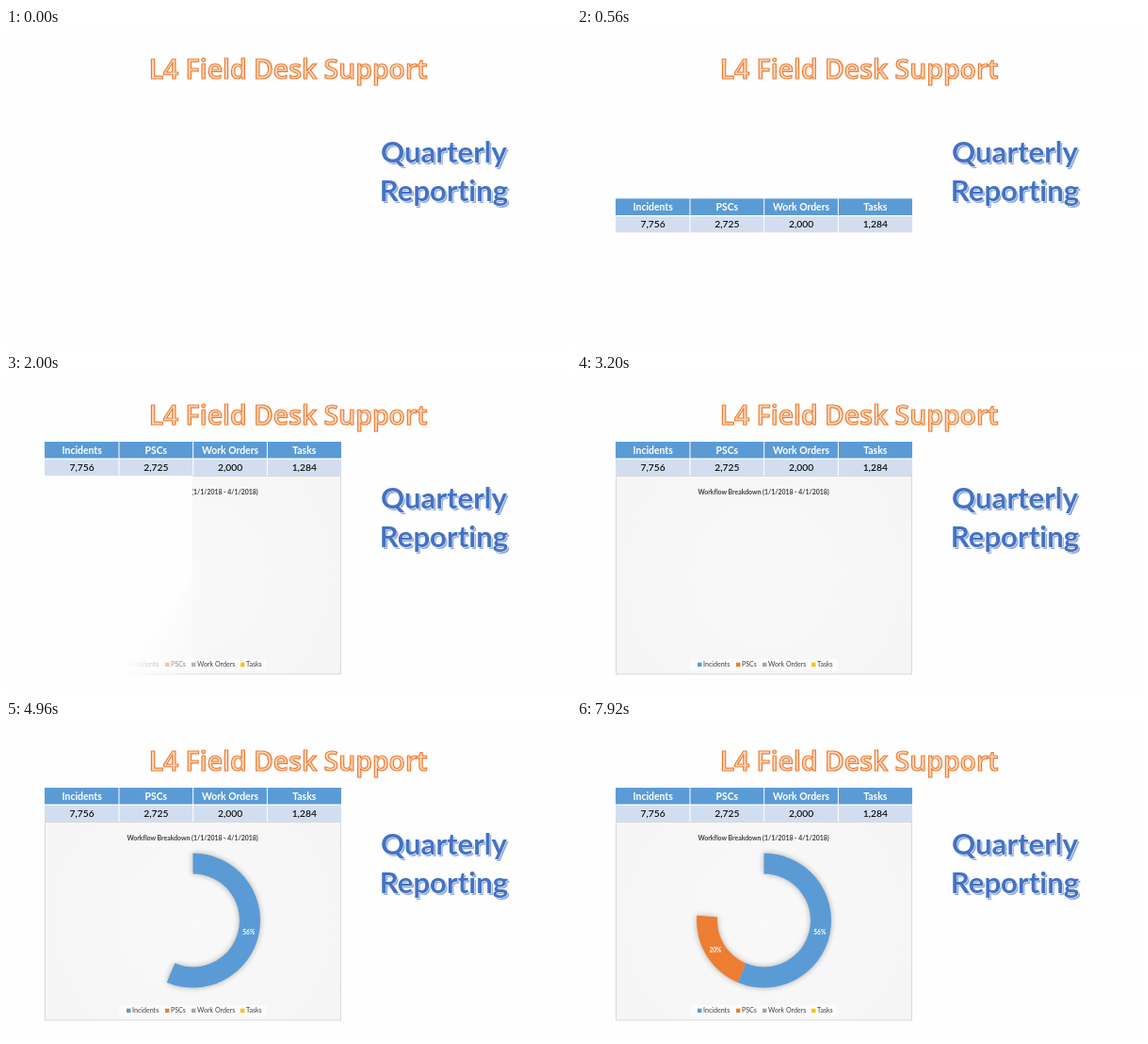
An HTML page that plays this animation: 600 by 338 pixels, repeating every 8 s.

```html
<!DOCTYPE html>
<html lang="en">
<head>
<meta charset="utf-8">
<title>Quarterly Reporting</title>
<style>
  html, body { margin: 0; width: 100%; height: 100%; overflow: hidden; background: #fefefe; }
  svg { position: absolute; left: 0; top: 0; width: 600px; height: 338px; }
  text { font-family: Lato, "Open Sans", sans-serif; text-anchor: middle; font-variant-ligatures: none; }
  .heading { font: 600 28.4px "Open Sans", "Noto Sans", sans-serif; fill: #f8d6be; stroke: #ed7d31; stroke-width: 1.2; }
  .side { font-size: 31.2px; font-weight: 700; }
  .head { font-size: 10.4px; font-weight: 700; fill: #fff; }
  .cell { font-size: 10.3px; font-weight: 500; fill: #000; }
  .caption { font-size: 6.9px; font-weight: 700; fill: #404040; }
  .key { font-size: 7.1px; fill: #404040; text-anchor: start; }
  .share { font-size: 6.6px; font-weight: 700; fill: #fff; }
  .shade { fill: #000; opacity: .3; filter: blur(3px); }
</style>
</head>
<body>
<svg id="titles" viewBox="0 0 600 338">
  <text class="heading" x="299.5" y="54">L4 Field Desk Support</text>
</svg>
<svg id="panel" viewBox="0 0 600 338">
  <defs>
    <radialGradient id="paper" gradientUnits="userSpaceOnUse" cx="198.5" cy="213" r="190">
      <stop offset="0" stop-color="#f9f9f9"/>
      <stop offset="1" stop-color="#f5f5f5"/>
    </radialGradient>
  </defs>
  <rect x="41.5" y="108.5" width="314" height="210.5" fill="url(#paper)" stroke="#d9d9d9"/>
  <text class="caption" x="198" y="127.6">Workflow Breakdown (1/1/2018 - 4/1/2018)</text>
  <rect x="120" y="303" width="157" height="12" fill="#fff" opacity=".6"/>
</svg>
<svg id="shade0" viewBox="0 0 600 338"></svg>
<svg id="shade1" viewBox="0 0 600 338"></svg>
<svg id="slice0" viewBox="0 0 600 338"></svg>
<svg id="slice1" viewBox="0 0 600 338"></svg>
<svg id="top" viewBox="0 0 600 338"><g id="table"></g></svg>
<script>
const NS = "http://www.w3.org/2000/svg";
const LOOP = 8000, STEP = 80;
const CX = 198.5, CY = 213, OUTER = 71.5, INNER = 49.5;
const SOFT = 45, SPEED = 0.433; // degrees, degrees per ms

const data = [
  { name: "Incidents", count: 7756, color: "#5b9bd5", keyX: 128 },
  { name: "PSCs", count: 2725, color: "#ed7d31", keyX: 169 },
  { name: "Work Orders", count: 2000, color: "#a5a5a5", keyX: 197 },
  { name: "Tasks", count: 1284, color: "#ffc000", keyX: 249 }
];
const total = data.reduce((sum, d) => sum + d.count, 0);
const $ = id => document.getElementById(id);

function add(parent, tag, attrs, content) {
  const el = document.createElementNS(NS, tag);
  for (const k in attrs) el.setAttribute(k, attrs[k]);
  if (content) el.textContent = content;
  parent.appendChild(el);
  return el;
}

function polar(r, deg) {
  const a = deg * Math.PI / 180;
  return `${(CX + r * Math.sin(a)).toFixed(2)} ${(CY - r * Math.cos(a)).toFixed(2)}`;
}

function ring(from, to) {
  const large = to - from > 180 ? 1 : 0;
  return `M${polar(OUTER, from)}A${OUTER} ${OUTER} 0 ${large} 1 ${polar(OUTER, to)}` +
    `L${polar(INNER, to)}A${INNER} ${INNER} 0 ${large} 0 ${polar(INNER, from)}Z`;
}

function buildSideTitle() {
  [["Quarterly", 143], ["Reporting", 184]].forEach(([word, y]) => {
    const at = (d, style) => add($("titles"), "text", { class: "side", x: 465 + d, y: y + d, ...style }, word);
    at(1.7, { fill: "#8faadc" });
    at(0, { fill: "#4472c4", stroke: "#fff", "stroke-width": 1.1, "paint-order": "stroke" });
  });
}

function buildTable() {
  const table = $("table"), w = 78.7;
  add(table, "rect", { x: 41, y: 0, width: 315, height: 18, fill: "#5b9bd5" });
  add(table, "rect", { x: 41, y: 18.3, width: 315, height: 17.7, fill: "#d2deef" });
  add(table, "path", { d: "M41 18.2H356", stroke: "#fff", "stroke-width": 1.2 });
  data.forEach((d, i) => {
    const x = 41.3 + w * i;
    if (i) add(table, "path", { d: `M${x} 0V36`, stroke: "#fff", "stroke-width": 1 });
    add(table, "text", { class: "head", x: x + w / 2, y: 13 }, d.name);
    add(table, "text", { class: "cell", x: x + w / 2, y: 31 }, d.count.toLocaleString("en-US"));
  });
}

function buildChart() {
  data.forEach(d => {
    add($("panel"), "rect", { x: d.keyX, y: 306.7, width: 4.4, height: 4.4, fill: d.color });
    add($("panel"), "text", { class: "key", x: d.keyX + 6, y: 311.4 }, d.name);
  });
  const labels = [[257.8, 227.6], [147, 246.8]];
  let from = 0;
  labels.forEach(([x, y], i) => {
    const share = data[i].count / total, to = from + share * 360;
    const d = ring(from, to), svg = $("slice" + i);
    add($("shade" + i), "path", { class: "shade", d });
    add(svg, "path", { d, fill: data[i].color });
    add(svg, "text", { class: "share", x, y }, Math.round(share * 100) + "%");
    from = to;
  });
}

const progress = (t, start, end) => Math.min(1, Math.max(0, (t - start) / (end - start)));
const smooth = p => p * p * (3 - 2 * p);

// Clockwise wheel reveal with a soft leading edge.
function wheel(t, start, ...ids) {
  const lead = (t - start) * SPEED, solid = lead - SOFT;
  const mask = solid >= 360 ? "none" :
    `conic-gradient(from 0deg at ${CX}px ${CY}px, #000 ${solid}deg, transparent ${lead}deg)`;
  ids.forEach(id => {
    const style = $(id).style;
    style.visibility = lead > 0 ? "visible" : "hidden";
    style.webkitMaskImage = mask;
    style.maskImage = mask;
  });
}

function draw(t) {
  const y = 338 - 228 * progress(t, 0, 815) - 38 * smooth(progress(t, 880, 1380));
  $("table").setAttribute("transform", `translate(0 ${y.toFixed(2)})`);
  wheel(t, 1500, "panel");
  wheel(t, 3500, "shade0", "slice0");
  wheel(t, 5900, "shade1", "slice1");
}

buildSideTitle();
buildTable();
buildChart();

const begin = performance.now();
function tick() {
  const t = (performance.now() - begin) % LOOP;
  draw(Math.floor(t / STEP) * STEP);
  requestAnimationFrame(tick);
}
tick();
</script>
</body>
</html>
```
